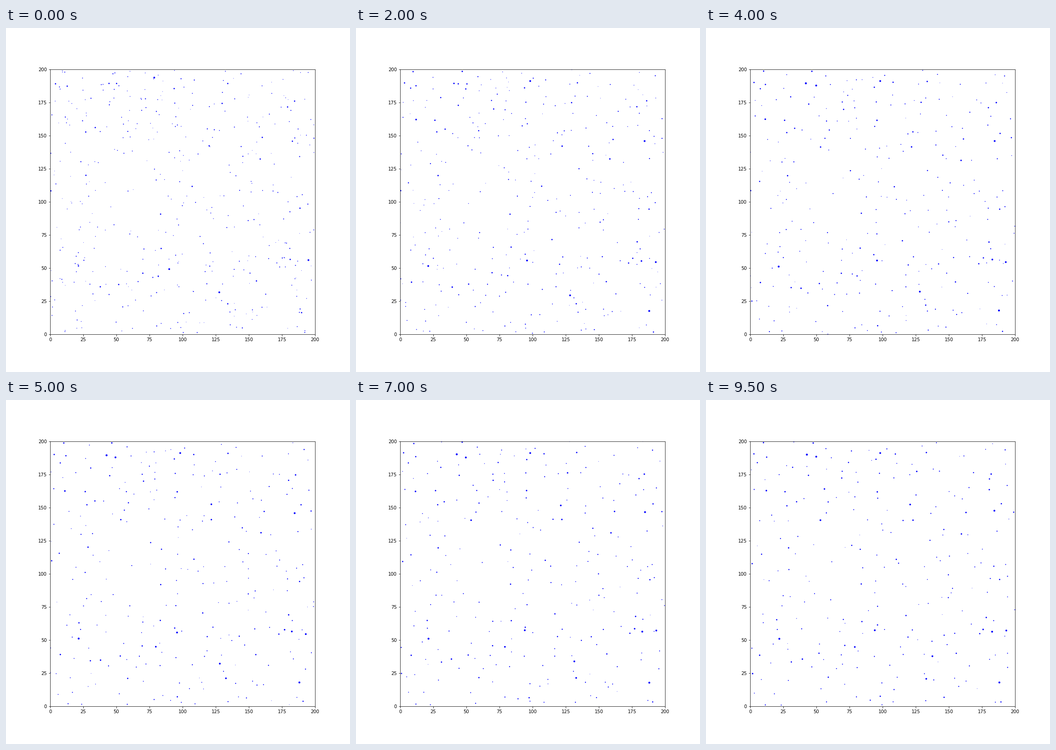
Write a matplotlib script that moves like this. It is 748 px wide and 748 px high and loops after 10000 ms.

```python
import numpy as np
import matplotlib.pyplot as plt
from matplotlib.animation import FuncAnimation

STAGE, DPI = 748, 72
LEFT, BOTTOM, SIDE = 96, 82, 576
SIZE, FRAMES, INTERVAL = 200, 20, 500
HEAVY_COUNT, HEAVY_MASS, GIANT_MASS = 30, 8, 15
MOBILITY = 3
rng = np.random.default_rng(12)

# The largest particles jump when they absorb another: step, x, y.
GIANTS = [
    [(0, 78.6, 193.8), (2, 89.8, 191.8), (4, 98.2, 191.2)],
    [(0, 89.9, 49.2), (2, 92.3, 55.7), (4, 95.8, 55.7), (12, 94.1, 57.4)],
    [(0, 195, 56), (2, 191.8, 54.8), (4, 193, 54.5), (12, 193.4, 57.2)],
    [(0, 127.7, 31.7), (2, 128.3, 29.4), (8, 128.1, 32.2),
     (12, 131.5, 33.9), (16, 137.6, 37.8)],
]


def population(step):
    return int(241 + 185 * np.exp(-step / 7))


def giant_positions(step):
    return [[key for key in path if key[0] <= step][-1][1:] for path in GIANTS]


def merge_closest(pos, mass):
    gap = ((pos[:, None] - pos[None]) ** 2).sum(axis=2)
    np.fill_diagonal(gap, np.inf)
    a, b = np.unravel_index(gap.argmin(), gap.shape)
    total = mass[a] + mass[b]
    pos[a] = (pos[a] * mass[a] + pos[b] * mass[b]) / total
    mass[a] = total
    return np.delete(pos, b, axis=0), np.delete(mass, b)


def simulate():
    count = population(0)
    pos = rng.uniform(0, SIZE, (count, 2))
    mass = rng.choice([1.0, 2, 3, 4, 5], count, p=[.17, .27, .26, .18, .12])
    mass[:HEAVY_COUNT] = HEAVY_MASS
    history = []
    for step in range(FRAMES):
        if step:
            # Light particles wander further and bounce off the walls.
            pos = pos + rng.normal(0, MOBILITY, pos.shape) / mass[:, None]
            pos = SIZE - abs(SIZE - abs(pos))
        while len(pos) > population(step):
            pos, mass = merge_closest(pos, mass)
        giants = giant_positions(step)
        history.append((np.vstack([pos, giants]),
                        np.r_[mass, [GIANT_MASS] * len(giants)]))
    return history


history = simulate()

fig = plt.figure(figsize=(STAGE / DPI, STAGE / DPI), dpi=DPI)
ax = fig.add_axes([v / STAGE for v in (LEFT, BOTTOM, SIDE, SIDE)])
ticks = range(0, SIZE + 1, 25)
ax.set(xlim=(0, SIZE), ylim=(0, SIZE), xticks=ticks, yticks=ticks)
dots = ax.scatter([], [], color="blue", linewidths=0)


def draw(step):
    pos, mass = history[step]
    dots.set_offsets(pos)
    dots.set_sizes(mass)
    return dots,


anim = FuncAnimation(fig, draw, frames=FRAMES, interval=INTERVAL,
                     repeat=True, repeat_delay=0)
plt.show()
```
